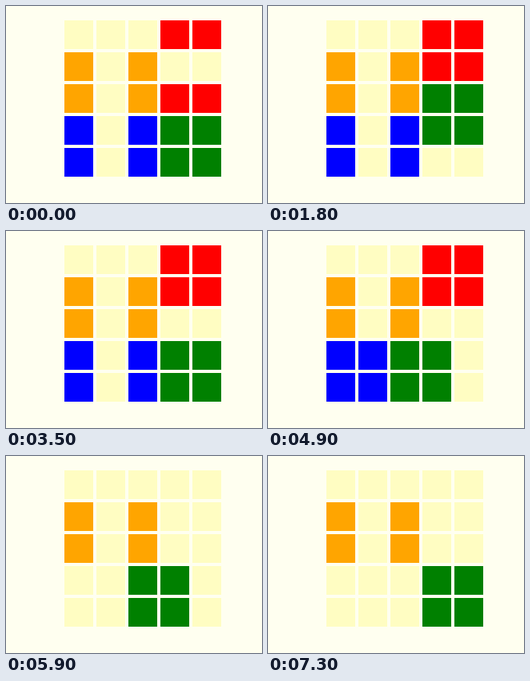
Recreate the animation shown at these times as an HTML page with a canvas. Size 320 by 247 pixels, loop 8 s.

```html
<!DOCTYPE html>
<html lang="en">
<head>
<meta charset="utf-8">
<title>Sliding blocks</title>
<style>
html, body { margin: 0; width: 100%; height: 100%; overflow: hidden; background: #fffff0; }
canvas { display: block; }
</style>
</head>
<body>
<canvas id="stage" width="320" height="247"></canvas>
<script>
const ctx = document.getElementById('stage').getContext('2d');
const LOOP = 8000, PITCH = 40, SIZE = 36, LEFT = 73, TOP = 18;
const colors = { '.': '#fffdc2', R: '#ff0000', O: '#ffa500', B: '#0000ff', G: '#008000' };

// Start time and the five rows of the board
const boards = [
  [0,    '...RR O.O.. O.ORR B.BGG B.BGG'],
  [1000, '...RR O.ORR O.OGG B.BGG B.B..'],
  [3300, '...RR O.ORR O.O.. B.BGG B.BGG'],
  [4900, '...RR O.ORR O.O.. BBGG. BBGG.'],
  [5900, '..... O.O.. O.O.. ..GG. ..GG.'],
  [7100, '..... O.O.. O.O.. ...GG ...GG']
];

function draw(now) {
  const t = now % LOOP;
  const board = boards.filter(([start]) => start <= t).pop()[1];
  ctx.fillStyle = '#fffff0';
  ctx.fillRect(0, 0, 320, 247);
  board.split(' ').forEach((row, y) => [...row].forEach((cell, x) => {
    ctx.fillStyle = colors[cell];
    ctx.fillRect(LEFT + x * PITCH, TOP + y * PITCH, SIZE, SIZE);
  }));
}

function frame() {
  draw(performance.now());
  requestAnimationFrame(frame);
}
frame();
</script>
</body>
</html>
```
